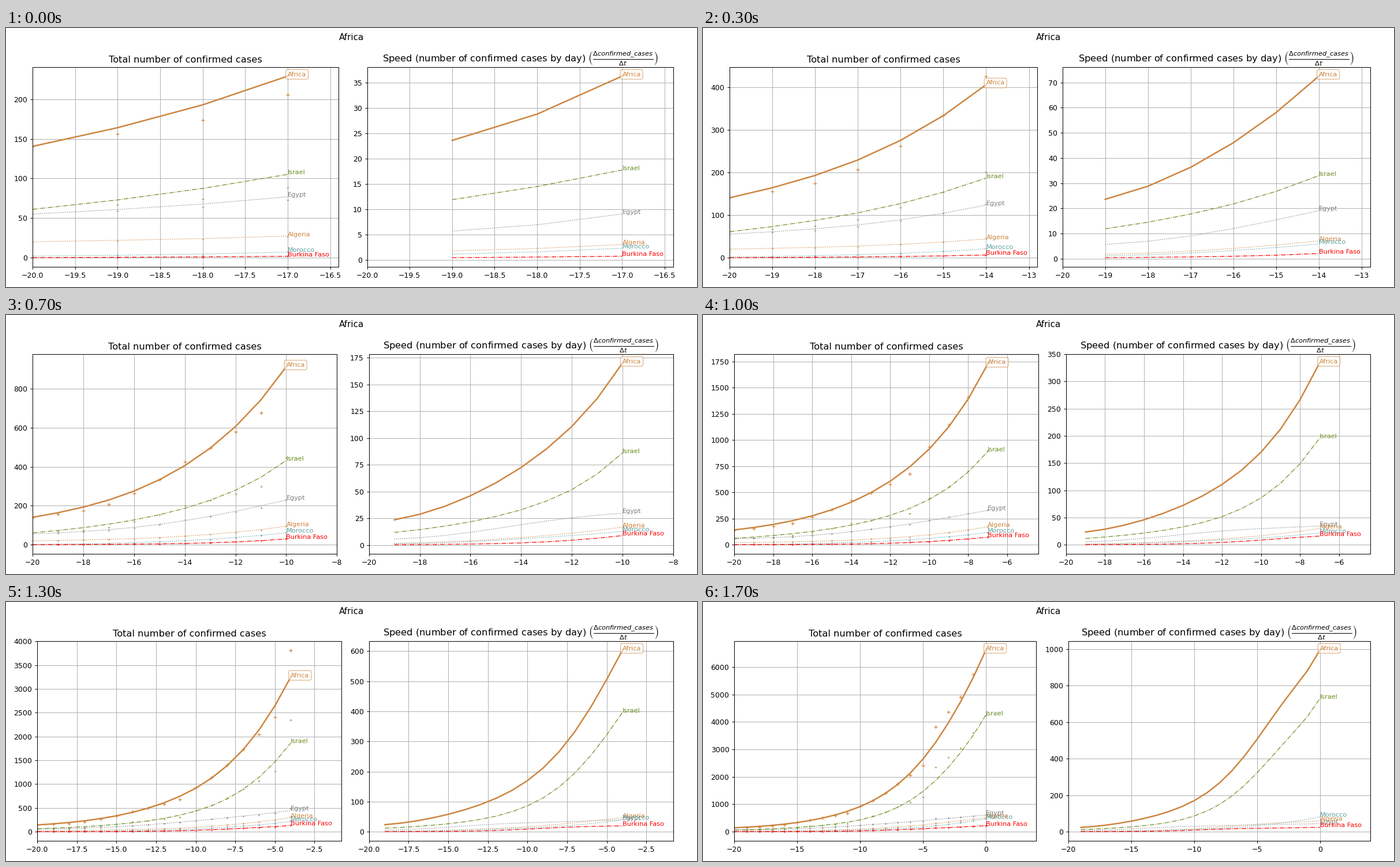
These frames come from a looping animation (1197x450 px, 4.7 s). A matplotlib script:

```python
import matplotlib.pyplot as plt
import numpy as np
from matplotlib.animation import FuncAnimation

W, H, DPI = 1197, 450, 90
FIRST_DAY, FIRST_SHOWN = -20, -17
STEP_MS, LOOP_MS = 100, 4700
PAD = 13.5                              # layout padding in pixels
RIGHT, BOTTOM, TOP = 1155.8, 35.2, 382.2

DAYS = np.arange(FIRST_DAY, 1)
RATE_DAYS = [-19, -18, -14, -9, -5, -1, 0]

# name: (colour, line style, line width, start, report swing, daily rate on RATE_DAYS)
SERIES = {
    "Africa": ("peru", "-", 2, 140.5, 1, [23.6, 28.8, 72.5, 212.3, 506, 881, 994]),
    "Israel": ("olivedrab", "-.", 1, 61, 1.5, [11.9, 14.5, 33, 113, 322, 630, 729]),
    "Egypt": ("gray", ":", 1, 55.1, 0.5, [5.7, 6.95, 19.1, 31.5, 38, 42.7, 44]),
    "Algeria": ("peru", ":", 1, 20.1, 0.5, [1.8, 2.27, 7.1, 20.5, 41.5, 55, 59.5]),
    "Morocco": ("cadetblue", ":", 1, 1.9, 0.5, [1.15, 1.6, 5.9, 15.2, 33, 68, 82]),
    "Burkina Faso": ("red", "-.", 1, 0, 0.5, [0.45, 0.57, 2.1, 11.5, 19, 23.2, 24.3]),
}

# Relative error of the reported counts: lagging reports, then a late catch-up.
REPORT_ERROR = np.interp(
    DAYS,
    [-20, -18, -17, -14, -11, -10, -7, -5, -4, -2, 0],
    [0, -0.1, -0.1, 0.05, -0.09, 0.02, 0.005, -0.09, 0.175, 0.037, 0])

TITLES = (
    "Total number of confirmed cases",
    "Speed (number of confirmed cases by day) "
    r"$\left(\frac{\Delta confirmed\_cases}{\Delta t}\right)$",
)

fig, axes = plt.subplots(1, 2, figsize=(W / DPI, H / DPI), dpi=DPI)
fig.suptitle("Africa", fontsize=12)
shown = {"day": None}


def daily_rate(key_rates):
    """Smooth growth: a polynomial through the logarithms of the key rates."""
    x = np.array(RATE_DAYS) / 10 + 1
    fit = np.polyfit(x, np.log(key_rates), len(x) - 1)
    return np.exp(np.polyval(fit, DAYS[1:] / 10 + 1))


def place_axes(left, right, gap):
    width = (right - left - gap) / 2
    fig.subplots_adjust(left=left / W, right=right / W, bottom=BOTTOM / H,
                        top=TOP / H, wspace=gap / width)


def fit_axes():
    """Size both axes from what sticks out of them in the default layout."""
    fig.subplots_adjust(left=0.125, right=0.9, bottom=0.11, top=0.88, wspace=0.2)
    first, second = axes
    outer, outer_second = first.get_tightbbox(), second.get_tightbbox()
    left = PAD + first.bbox.x0 - outer.x0
    gap = (PAD + outer.x1 - first.bbox.x1
           + second.bbox.x0 - outer_second.x0)
    place_axes(left, RIGHT, gap)


def add_curve(ax, name, days, values):
    color, style, width = SERIES[name][:3]
    ax.plot(days, values, style, color=color, lw=width)
    box = None
    if name == "Africa":
        box = dict(boxstyle="round", facecolor="white", edgecolor=color, alpha=0.6)
    ax.text(days[-1], values[-1], name, color=color, fontsize=9, bbox=box)


def update(i):
    day = min(FIRST_SHOWN + i, 0)
    if day == shown["day"]:
        return
    shown["day"] = day
    span = day - FIRST_DAY
    days = DAYS[:span + 1]
    total_ax, speed_ax = axes

    for ax, title in zip(axes, TITLES):
        ax.clear()
        ax.grid(True)
        ax.set_title(title, fontsize=13)

    for name, (color, _, width, start, swing, key_rates) in SERIES.items():
        rate = daily_rate(key_rates)
        total = start + np.append(0, np.cumsum(rate))
        counts = np.round(total * (1 + swing * REPORT_ERROR))
        size, edge = (5, 1) if width > 1 else (3, 0.55)
        total_ax.plot(days, counts[:span + 1], "+", color=color, ms=size, mew=edge)
        add_curve(total_ax, name, days, total[:span + 1])
        add_curve(speed_ax, name, days[1:], rate[:span])

    for ax in axes:
        ax.set_xlim(FIRST_DAY, FIRST_DAY + 1.2 * span)
    fit_axes()


anim = FuncAnimation(fig, update, frames=LOOP_MS // STEP_MS, interval=STEP_MS,
                     repeat=True, repeat_delay=0)
plt.show()
```
